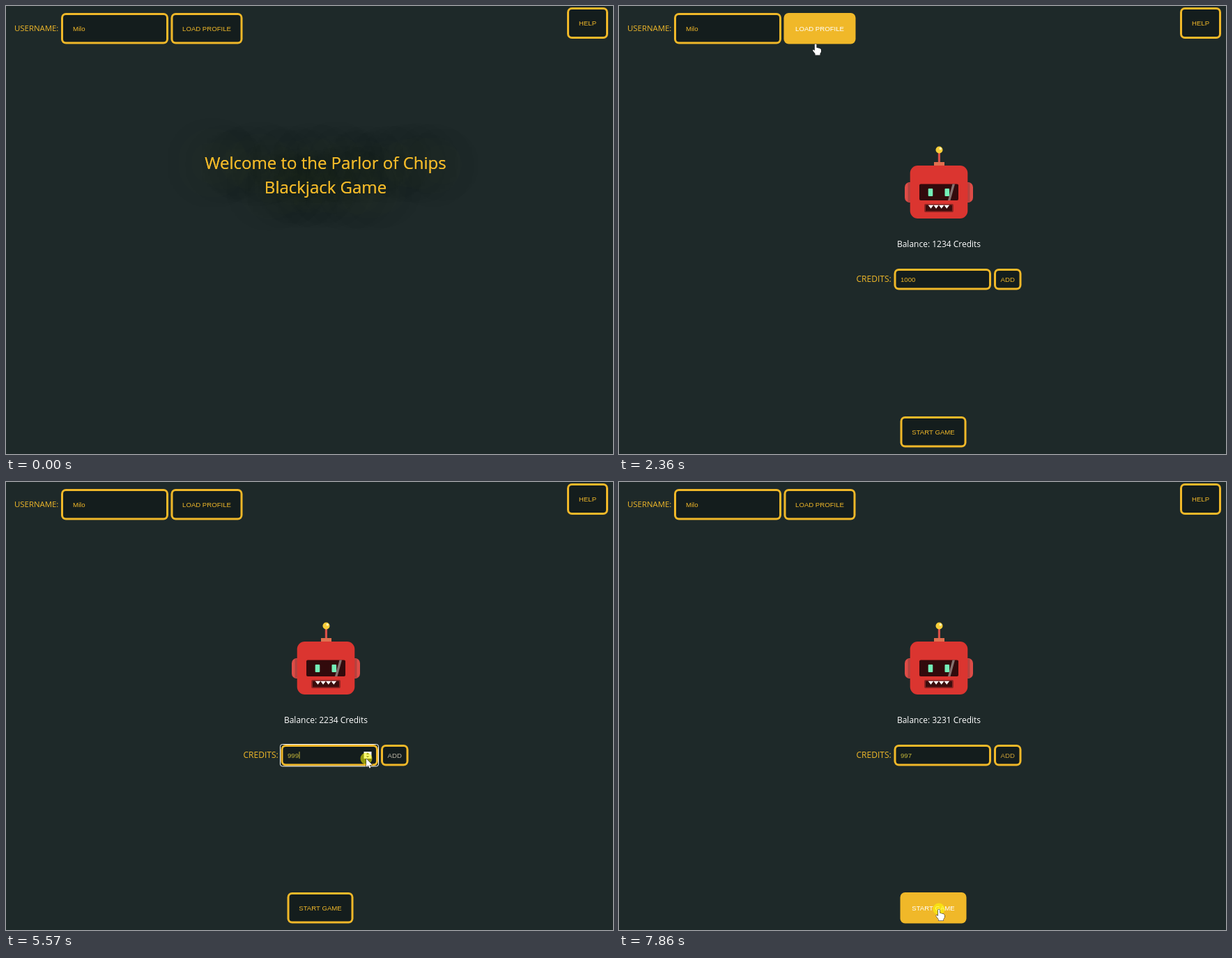
Recreate the animation shown at these times as an HTML page with a canvas. Size 871x643 px, loop 7990 ms.

```html
<!DOCTYPE html>
<html lang="en">
<head>
<meta charset="utf-8">
<title>Blackjack Game</title>
<style>
  html, body { margin: 0; width: 100%; height: 100%; overflow: hidden; background: #1e2929; }
  canvas { display: block; width: 100%; height: 100%; }
</style>
</head>
<body>
<canvas id="stage" width="871" height="643"></canvas>
<script>
const ctx = document.getElementById('stage').getContext('2d');
const LOOP = 7990;
const BG = '#1e2929';
const GOLD = [240, 184, 41], DARK = [20, 29, 29], WHITE = [255, 255, 255];
const UI = '9.6px "Liberation Sans", Arial, sans-serif';
const SANS = '"Open Sans", "Noto Sans", sans-serif';

// x, y, width, height
const LOAD = [236.5, 10, 103, 44.5];
const HELP = [805, 2, 59, 45];
const START = [403.5, 589, 95, 44.5];
const ADD = [538, 377, 39.5, 30.5];
const NAME = [79, 10, 154, 44.5];
const CREDITS = [394.5, 377, 139.5, 30.5];

// Screen updates: first time, last time, number of steps
const BURSTS = [
  [100, 320, 4], [640, 1420, 12], [1490, 1960, 6], [2360, 3120, 12],
  [3190, 3940, 12], [4210, 4700, 8], [4840, 5110, 5], [5570, 6310, 10],
  [6380, 6580, 4], [6910, 7650, 12], [7860, 7860, 1]
];

// Pointer path: time, x, y
const PATH = [
  [100, 819, 620], [173, 722, 508], [247, 570, 405], [320, 491, 360],
  [640, 484, 345], [880, 430, 180], [1136, 327, 17], [1420, 286, 34],
  [1960, 286, 34], [2360, 282, 54], [2640, 330, 210], [2860, 420, 380],
  [2980, 452, 425], [3120, 480, 397], [3190, 490, 396], [3395, 535, 394],
  [3530, 556, 393], [4210, 556, 393], [4420, 481, 397], [4700, 521, 394],
  [4840, 521, 396], [5110, 517, 397], [5950, 517, 397], [6200, 556, 392],
  [6580, 556, 392], [6910, 562, 372], [7044, 590, 258], [7246, 486, 394],
  [7448, 462, 575], [7582, 459, 613], [7990, 459, 613]
];

const CLICKS = [
  [1490, 1700], [3700, 3880], [5570, 5640], [5710, 5790],
  [5860, 5940], [6440, 6570], [7860, 7990]
];

const clamp = v => Math.max(0, Math.min(1, v));
const ramp = (t, a, b) => clamp((t - a) / (b - a));
const within = (t, a, b) => t >= a && t < b;
const mix = (a, b, p) => `rgb(${a.map((v, i) => Math.round(v + (b[i] - v) * p))})`;
const inside = (x, y, [bx, by, w, h], pad = 0) =>
  x >= bx - pad && x <= bx + w + pad && y >= by - pad && y <= by + h + pad;

function snap(t) {
  let out = 0;
  for (const [a, b, n] of BURSTS) {
    if (t < a) break;
    const step = n > 1 ? (b - a) / (n - 1) : 1;
    out = Math.min(b, a + Math.floor((t - a) / step + 0.05) * step);
  }
  return out;
}

function pointer(t) {
  const i = Math.max(1, PATH.findIndex(k => k[0] >= t));
  const [a, x0, y0] = PATH[i - 1], [b, x1, y1] = PATH[i];
  const p = ramp(t, a, b);
  return [x0 + (x1 - x0) * p, y0 + (y1 - y0) * p];
}

function text(str, x, y, font, color, align = 'left') {
  ctx.font = font;
  ctx.fillStyle = color;
  ctx.textAlign = align;
  ctx.fillText(str, x, y);
}

function rounded(x, y, w, h, r, fill) {
  ctx.beginPath();
  ctx.roundRect(x, y, w, h, r);
  ctx.fillStyle = fill;
  ctx.fill();
}

function rect(x, y, w, h, fill) {
  ctx.fillStyle = fill;
  ctx.fillRect(x, y, w, h);
}

function poly(points, fill, stroke) {
  ctx.beginPath();
  points.forEach(([x, y]) => ctx.lineTo(x, y));
  ctx.closePath();
  if (stroke) {
    ctx.strokeStyle = stroke;
    ctx.lineWidth = 1;
    ctx.lineJoin = 'round';
    ctx.stroke();
  }
  ctx.fillStyle = fill;
  ctx.fill();
}

function disc(x, y, r, fill) {
  ctx.beginPath();
  ctx.arc(x, y, r, 0, 2 * Math.PI);
  ctx.fillStyle = fill;
  ctx.fill();
}

function frame([x, y, w, h], fill) {
  rounded(x, y, w, h, 7, mix(GOLD, GOLD, 0));
  rounded(x + 3, y + 3, w - 6, h - 6, 4, fill);
}

function button(box, label, hover = 0, rest = GOLD) {
  const [x, y, w, h] = box;
  frame(box, mix(DARK, GOLD, hover));
  text(label, x + w / 2, y + h / 2 + 3.3, UI, mix(rest, WHITE, hover), 'center');
}

function field(box, value, pad, color) {
  frame(box, mix(DARK, DARK, 0));
  text(value, box[0] + pad, box[1] + box[3] / 2 + 3.3, UI, color);
}

function welcome() {
  const lines = [['Welcome to the Parlor of Chips', 234], ['Blackjack Game', 269]];
  const font = '500 24px ' + SANS;
  ctx.save();
  ctx.shadowBlur = 60;
  ctx.shadowColor = 'rgba(190, 180, 50, 0.6)';
  lines.forEach(([s, y]) => text(s, 458.5, y, font, '#f0b829', 'center'));
  ctx.restore();
  lines.forEach(([s, y]) => text(s, 458.5, y, font, '#f0b829', 'center'));
}

function robot() {
  // antenna
  rect(457.8, 210, 3.2, 15, '#d94f48');
  rect(452, 224, 15, 6, '#e0704f');
  disc(459.5, 206.5, 5, '#f6cd38');
  disc(461.2, 204.8, 1.7, '#fff3c0');
  // ears
  rounded(410, 253, 14, 29, 8, '#de4c47');
  rounded(494, 253, 14, 29, 8, '#de4c47');
  rect(414.5, 254, 4, 27, '#b5423f');
  rect(500, 254, 3.5, 27, '#b5423f');
  // head
  rounded(417.7, 229, 82.6, 76, 11, '#db3530');
  rounded(431, 255.5, 56, 23.5, 2, '#320a0c');
  rounded(443.7, 262, 6.6, 11, 1, '#74efb8');
  rounded(467.5, 262, 6.6, 11, 1, '#74efb8');
  poly([[478.5, 255.5], [482, 255.5], [475.5, 279], [472, 279]], '#85706f');
  // mouth
  rounded(438, 284, 42, 12, 2, '#8f2422');
  rect(440, 285.7, 38, 8.6, '#3a0d0d');
  for (let i = 0; i < 4; i++) {
    const x = 447.5 + i * 7.6;
    poly([[x - 3.8, 285.7], [x + 3.8, 285.7], [x, 290.8]], '#ffffff');
  }
}

function spinner() {
  rect(513.5, 387, 11, 10, '#efefef');
  poly([[516.8, 391], [521.2, 391], [519, 388.6]], '#333');
  poly([[516.8, 393.2], [521.2, 393.2], [519, 395.6]], '#333');
}

function profile(t, x, y) {
  robot();
  const balance = t < 3790 ? 1234 : t < 6440 ? 2234 : 3231;
  text(`Balance: ${balance} Credits`, 459, 346, '500 12px ' + SANS, '#ffffff', 'center');
  text('CREDITS:', 340.5, 396, '12px ' + SANS, '#f0b829');

  const value = t < 5570 ? 1000 : t < 5710 ? 999 : t < 5850 ? 998 : 997;
  const focused = within(t, 5570, 6440);
  field(CREDITS, value, 9.5, t < 5570 ? '#f0b829' : '#c5b73a');
  if (focused) {
    ctx.lineWidth = 1;
    ctx.strokeStyle = '#ffffff';
    ctx.beginPath();
    ctx.roundRect(393.5, 376.5, 141, 31.5, 3);
    ctx.stroke();
    rect(420.5, 387, 1, 10, '#c5b73a');
  }
  if (focused || (t < 6440 && inside(x, y, CREDITS, 2))) spinner();

  const addHover = Math.max(
    Math.min(ramp(t, 3430, 3840), 1 - ramp(t, 4230, 4640)),
    Math.min(ramp(t, 6080, 6440), 1 - ramp(t, 6910, 7300))
  );
  const addText = t < 4210 ? GOLD : t < 6380 ? [188, 182, 165] : [205, 163, 55];
  button(ADD, 'ADD', addHover, addText);
  button(START, 'START GAME', ramp(t, 7390, 7650));
}

function arrow() {
  poly([[0, 0], [0, 12], [2.8, 9.6], [4.6, 13.7], [6.4, 12.9], [4.7, 8.9], [8.4, 8.9]],
    '#ffffff', '#111');
}

function hand() {
  poly([[-1.2, 1], [0, 0.2], [1.4, 1], [1.4, 5.8], [6.6, 7], [8, 8.4], [8, 12],
    [6.5, 14.2], [6.5, 16.5], [-0.5, 16.5], [-0.5, 14.5], [-4, 10], [-3.2, 8.4],
    [-1.2, 10]], '#ffffff', '#111');
}

function beam() {
  rect(-0.5, -5, 1, 10, '#d8dada');
  rect(-2.5, -5.5, 5, 1, '#d8dada');
  rect(-2.5, 4.5, 5, 1, '#d8dada');
}

function cursor(x, y) {
  const onSpinner = within(x, 513, 526) && within(y, 386, 398);
  const shape = [LOAD, ADD, START].some(b => inside(x, y, b)) ? hand
    : inside(x, y, CREDITS, 2) && !onSpinner ? beam : arrow;
  ctx.save();
  ctx.translate(x, y);
  shape();
  ctx.restore();
}

function draw(time) {
  const t = snap(time);
  const [x, y] = pointer(t);
  rect(0, 0, 871, 643, BG);
  text('USERNAME:', 12, 35.6, '11.4px ' + SANS, '#f0b829');
  field(NAME, 'Milo', 17, '#f0b829');
  button(LOAD, 'LOAD PROFILE', Math.min(ramp(t, 960, 1400), 1 - ramp(t, 2400, 2820)));
  button(HELP, 'HELP');

  if (t < 1600) welcome();
  else profile(t, x, y);

  if (CLICKS.some(([a, b]) => within(t, a, b))) disc(x, y, 8.5, 'rgba(255, 255, 0, 0.55)');
  if (t >= 100) cursor(x, y);
}

const begin = performance.now();
function tick() {
  draw((performance.now() - begin) % LOOP);
  requestAnimationFrame(tick);
}
tick();
</script>
</body>
</html>
```
